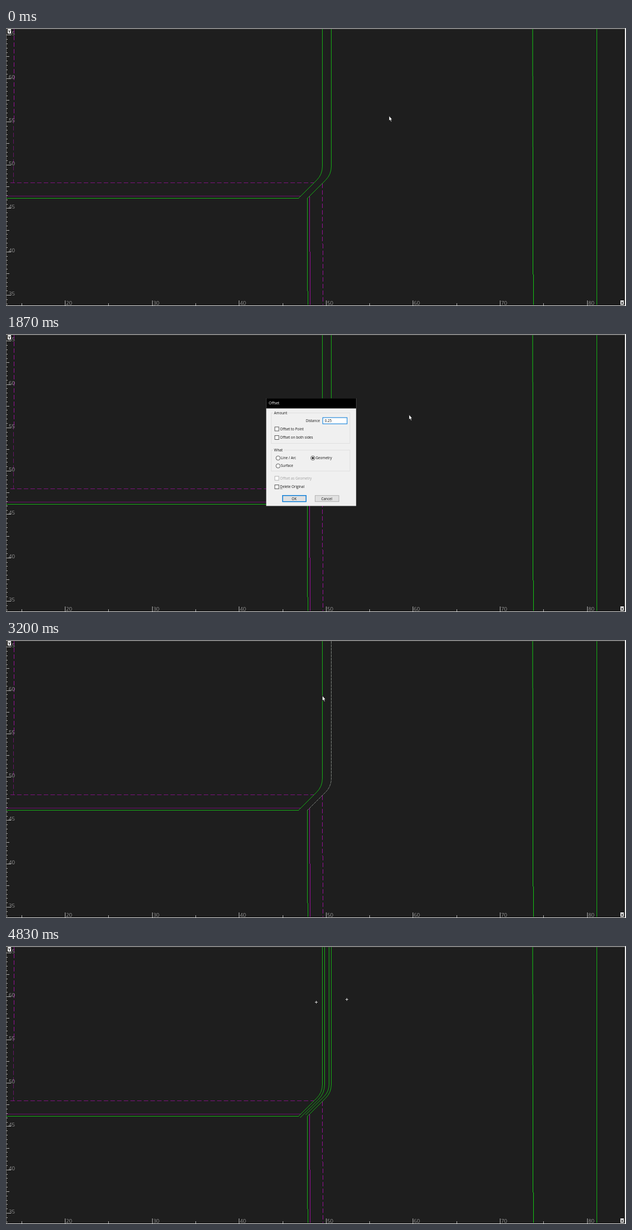
An HTML page that plays this animation: 1116x502 px, repeating every 5.81 s.

```html
<!DOCTYPE html>
<html lang="en">
<head>
<meta charset="utf-8">
<title>Offset geometry</title>
<style>
  html, body { margin: 0; width: 100%; height: 100%; overflow: hidden; background: #1e1e1e; }
  svg { display: block; width: 1116px; height: 502px; }
  text { font-family: "Open Sans", "Noto Sans", sans-serif; white-space: pre; }
  .line { fill: none; stroke: #16b016; stroke-width: 1; }
  .bright { stroke: #14c814; }
  .crisp { shape-rendering: crispEdges; }
  .magenta { fill: none; stroke: #980f98; }
  .dash { stroke-dasharray: 8 4; }
  .hover { stroke: #7d827d; stroke-dasharray: 5 1; }
  .ruler { stroke: #b4b4b4; fill: none; }
  .label { fill: #d0d0d0; font-size: 9.6px; font-weight: 300; }
  .axis { font-size: 7px; font-weight: 700; text-anchor: middle; fill: #111; }
  .ui { font-size: 6.2px; fill: #111; }
  .box { fill: #fff; stroke: #333; stroke-width: .8; }
  .group { fill: none; stroke: #dcdcdc; stroke-width: .8; }
</style>
</head>
<body>
<svg id="stage" viewBox="0 0 1116 502">
  <rect width="1116" height="502" fill="#1e1e1e"/>

  <g class="crisp">
    <path class="magenta dash" d="M14.5 2V165"/>
    <path class="magenta dash" stroke-opacity=".6" d="M13.5 165V280"/>
    <path class="magenta dash" stroke-opacity=".8" d="M8 279.5H554"/>
    <path class="magenta dash" d="M569.5 281V390M570.5 390V500"/>
    <path class="magenta" d="M546.5 304V404M547.5 404V500"/>
    <path class="magenta" stroke-opacity=".65" d="M1 303.5H530"/>
    <path class="line" d="M1 307.5H527"/>
    <path class="line" d="M542.5 307V475M543.5 475V500"/>
    <path class="line" d="M1063.5 2V500"/>
    <path class="line bright" d="M948.5 215V445M949.5 445V500"/>
  </g>
  <path class="line bright" d="M948 2V87M948.3 87V215"/>
  <g id="bends"></g>
  <g id="marks" class="crisp" stroke="#d0d0d0"></g>

  <g id="rulers" class="crisp"></g>
  <g class="crisp" fill="none">
    <path stroke="#696969" d="M0 1.5H1115M.5 1V502"/>
    <path stroke="#a0a0a0" d="M0 .5H1116"/>
    <path stroke="#e3e3e3" d="M0 501.5H1115M1114.5 1V502"/>
    <path stroke="#fff" d="M1115.5 0V502"/>
  </g>
  <rect x="3" y="2" width="6" height="8" fill="#fff"/>
  <text class="axis" x="6" y="8.6">Y</text>
  <rect x="1106" y="492" width="6" height="8" fill="#fff"/>
  <text class="axis" x="1109" y="498.6">X</text>

  <g id="dialog">
    <rect x="470" y="118" width="159" height="191" fill="#f0f0f0"/>
    <rect x="470" y="118" width="159" height="18" fill="#000"/>
    <text x="474.5" y="129.2" font-size="6.6" fill="#fff">Offset</text>
    <path id="close" d="M617.5 123.8l5 5m0-5l-5 5" stroke="#fff" stroke-width=".9"/>
    <rect class="group" x="479" y="144" width="139" height="54"/>
    <rect class="group" x="479" y="210" width="139" height="37"/>
    <rect x="482" y="141" width="25" height="6" fill="#f0f0f0"/>
    <rect x="482" y="207" width="19" height="6" fill="#f0f0f0"/>
    <rect x="570" y="152.3" width="43" height="11" fill="#fff" stroke="#0078d7"/>
    <rect id="selection" x="572.5" y="153.5" width="11" height="8.5" fill="#0078d7"/>
    <text id="value" class="ui" x="573.5" y="160.2"></text>
    <g id="controls"></g>
    <rect x="499" y="290.5" width="41.5" height="10.8" fill="#e1e1e1" stroke="#0078d7" stroke-width="1.4"/>
    <rect x="556.5" y="290.5" width="42" height="10.8" fill="#e1e1e1" stroke="#adadad" stroke-width=".9"/>
    <text class="ui" x="519.5" y="298.2" text-anchor="middle">OK</text>
    <text class="ui" x="577" y="298.2" text-anchor="middle">Cancel</text>
    <path d="M494.5 278.6h4.3" stroke="#111" stroke-width=".5"/>
  </g>

  <path id="cursor" d="M.4 .6V9.6L2.3 8L4 11.3L5.3 10.7L3.9 7.4H6.4Z" fill="#fff" stroke="#111" stroke-width=".7"/>
</svg>
<script>
const LOOP = 5810;
const $ = id => document.getElementById(id);

function add(parent, tag, attrs, text) {
  const el = document.createElementNS("http://www.w3.org/2000/svg", tag);
  for (const key in attrs) el.setAttribute(key, attrs[key]);
  if (text) el.textContent = text;
  $(parent).append(el);
  return el;
}

// Vertical run, 45 degree arc, then a diagonal down to endY.
function bend(x, radius, endY) {
  const dx = radius * (1 - Math.SQRT1_2), dy = radius * Math.SQRT1_2;
  const run = endY - 250 - dy;
  return add("bends", "path", {
    class: "line",
    d: `M${x} 2V250a${radius} ${radius} 0 0 1 ${-dx} ${dy}l${-run} ${run}`
  });
}
const leftBend = bend(569.5, 35, 307.5);
const rightBend = bend(585.5, 35, 307.5);
const firstOffset = bend(581.5, 31, 305);
const secondOffset = bend(573.5, 38.5, 310);

const plus = (x, y) => add("marks", "path", { d: `M${x - 2} ${y + .5}h5M${x + .5} ${y - 2}v5` });
const firstMark = plus(558, 101);
const secondMark = plus(613, 96);

function drawRulers() {
  const unit = 15.66;
  const tick = d => add("rulers", "path", { class: "ruler", d });
  for (let v = 15; v <= 80; v += 5) {
    const x = Math.round(106 + (v - 20) * unit) + .5;
    const major = v % 10 === 0;
    tick(`M${x} 501v${major ? -9 : -4}`);
    if (major) add("rulers", "text", { class: "label", x: x + 1.5, y: 499.5 }, v);
  }
  for (let i = 0; i <= 62; i++) {
    const v = 34 + i / 2;
    const y = Math.round(482 - (v - 35) * unit) + .5;
    if (y < 3) continue;
    tick(`M1 ${y}h${v % 5 === 0 ? 8 : v % 2.5 === 0 ? 5 : 2}`);
    if (v % 5 === 0) add("rulers", "text", { class: "label", x: 5, y: y + .5 }, v);
  }
}
drawRulers();

function drawControls() {
  const label = (x, y, text, fill = "#111") =>
    add("controls", "text", { class: "ui", x, y: y + 2.2, style: `fill:${fill}` }, text);
  const check = (y, text, color) => {
    add("controls", "rect", { class: "box", x: 485.3, y: y - 3.6, width: 7, height: 7, style: color ? `stroke:${color}` : "" });
    label(494.5, y, text, color);
  };
  const radio = (x, y, text, on) => {
    add("controls", "circle", { class: "box", cx: x, cy: y, r: 3.7 });
    if (on) add("controls", "circle", { cx: x, cy: y, r: 2, fill: "#222" });
    label(x + 5, y, text);
  };
  label(484, 144, "Amount");
  label(540, 158, "Distance");
  check(172.5, "Offset to Point");
  check(187.7, "Offset on both sides");
  label(484, 209.6, "What");
  radio(491, 224, "Line / Arc");
  radio(552.5, 224, "Geometry", true);
  radio(491, 238, "Surface");
  check(260, "Offset as Geometry", "#a0a0a0");
  check(275.3, "Delete Original");
}
drawControls();

// time, scale, opacity
const fades = [
  [0, 1, 0], [1170, .965, .09], [1200, .975, .28], [1230, .985, .5], [1270, .993, .69],
  [1300, 1, .81], [1330, 1.006, .9], [1370, 1.012, .96], [1400, 1.018, 1],
  [2100, 1.002, .75], [2130, .987, .48], [2170, .972, .22], [2200, .962, .08], [2230, 1, 0]
];
const typing = [[0, "2.5"], [1470, "0"], [1530, "0."], [1830, "0.2"], [1870, "0.25"]];
// time, x, y
const route = [
  [0, 689, 158], [299, 689, 158], [300, 707, 151], [329, 707, 151], [330, 725, 145],
  [2400, 725, 145], [2640, 587, 99], [2990, 587, 99], [3300, 561, 101],
  [3540, 561, 101], [3700, 566, 101], [4180, 566, 101], [4400, 613, 96],
  [4500, 613, 96], [4770, 103, 431], [4799, 103, 431], [4800, 49, 487], [LOOP, 49, 487]
];

const stepAt = (table, t) => table.findLast(row => row[0] <= t);

function pointAt(t) {
  const i = route.findIndex(row => row[0] > t);
  const [t0, x0, y0] = route[i - 1], [t1, x1, y1] = route[i];
  const p = (t - t0) / (t1 - t0);
  return [x0 + (x1 - x0) * p, y0 + (y1 - y0) * p];
}

const within = (t, from, to) => t >= from && t < to;
const show = (el, on) => { el.style.display = on ? "" : "none"; };

function render(now) {
  const t = now % LOOP;
  const [, scale, opacity] = stepAt(fades, t);
  show($("dialog"), opacity > 0);
  $("dialog").setAttribute("opacity", opacity);
  $("dialog").setAttribute("transform", `translate(549.3 213.3) scale(${scale}) translate(-549.5 -213.5)`);
  $("value").textContent = stepAt(typing, t)[1];
  $("value").style.fill = t < 1470 ? "#fff" : "#111";
  show($("selection"), t < 1470);
  show($("close"), t < 1870);

  rightBend.classList.toggle("hover", within(t, 2730, 3400));
  leftBend.classList.toggle("hover", within(t, 3930, 4470));
  show(firstOffset, t >= 3400);
  show(firstMark, t >= 3400);
  show(secondOffset, t >= 4470);
  show(secondMark, t >= 4470);

  const [x, y] = pointAt(t);
  show($("cursor"), t < 4830 && !within(t, 1470, 1870));
  $("cursor").setAttribute("transform", `translate(${Math.round(x)} ${Math.round(y)})`);
}

function loop() {
  render(performance.now());
  requestAnimationFrame(loop);
}
loop();
</script>
</body>
</html>
```
